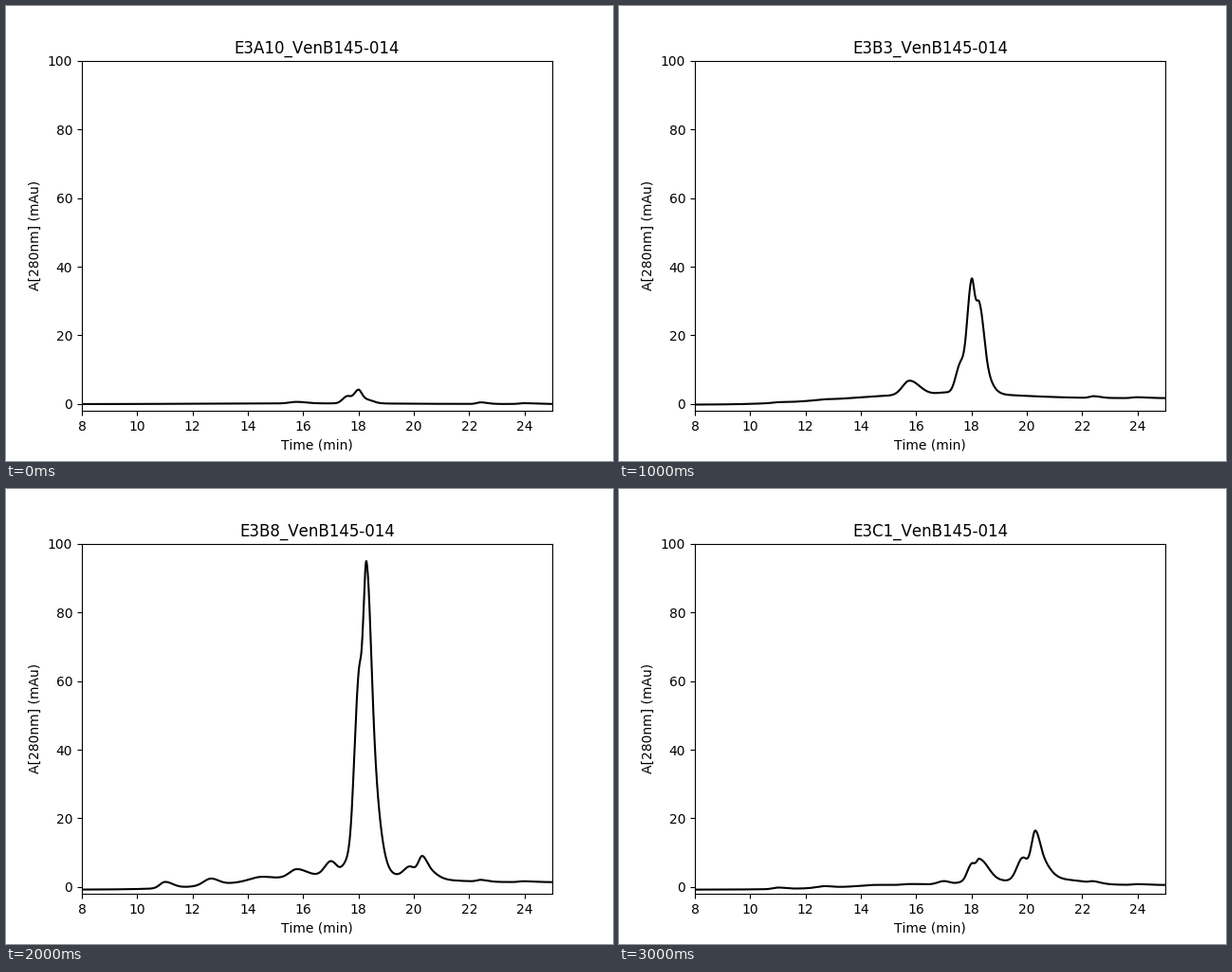
Animation, 640 px wide and 480 px high, one loop 3200 ms. Source, as a matplotlib script:

```python
import numpy as np
import matplotlib.pyplot as plt
from matplotlib.animation import FuncAnimation

plt.rcParams["text.kerning_factor"] = 6

RUNS = 16
INTERVAL = 200


def bell(x, center, left, right):
    width = np.where(x < center, left, right)
    return np.exp(-0.5 * ((x - center) / width) ** 2)


def sigmoid(x, center, width):
    return 1 / (1 + np.exp((center - x) / width))


# Every compound elutes at a fixed time and swells and fades over the runs.
# Each family shares one course: strongest run, spread before, spread after.
# Its peaks: elution time, left width, right width, greatest height.
FAMILIES = {
    (3.7, 2.2, 4.6): [(12.5, 1.5, 2.0, .5), (17.58, .16, .14, 8.2),
                      (18.25, .13, .25, 4.5)],
    (5.7, 2.7, 3.8): [(15.75, .25, .36, 4.25)],
    (9.2, 4.0, 2.7): [(17.6, 2.5, 2.0, 2.3), (17.99, .16, .12, 54)],
    (8.6, 2.2, 1.9): [(18.29, .13, .15, 53)],
    (10.7, 2.9, 2.15): [(18.29, .13, .33, 48)],
    (11.6, 2.9, 1.9): [(11.0, .18, .28, 2.1), (12.65, .25, .28, 2.2),
                       (14.42, .36, .40, 1.1), (17.0, .22, .22, 4.7)],
    (12.8, 1.3, 1.27): [(19.2, .6, .8, 4.4), (19.85, .21, .19, 31),
                        (20.31, .15, .15, 26), (20.31, .15, .38, 39)],
    (14.0, 1.8, 3.0): [(21.2, .6, .9, 1.6)],
    (8.0, 20, 20): [(22.4, .13, .25, .5), (23.95, .15, .40, .25)],
}


def trace(run):
    offset = -0.75 * sigmoid(run, 6, 0.8)
    drift = 2.4 * bell(run, 6.5, 2.2, 8) * sigmoid(time, 13.2, 1.1)
    y = offset + drift
    for course, peaks in FAMILIES.items():
        for *shape, height in peaks:
            y = y + height * bell(run, *course) * bell(time, *shape)
    return y


def well(run):
    row, col = divmod(run + 9, 12)
    return f"E3{'ABC'[row]}{col + 1}"


time = np.linspace(8, 25, 1200)

fig, ax = plt.subplots(figsize=(6.4, 4.8), dpi=100)
ax.set(xlim=(8, 25), ylim=(-2, 100), xlabel="Time (min)", ylabel="A[280nm] (mAu)")
line, = ax.plot([], [], color="black", lw=1.5)
title = ax.set_title("")


def update(run):
    line.set_data(time, trace(run))
    title.set_text(f"{well(run)}_VenB145-014")
    return line, title


anim = FuncAnimation(fig, update, frames=RUNS, interval=INTERVAL,
                     repeat=True, repeat_delay=0, blit=False)
plt.show()
```
